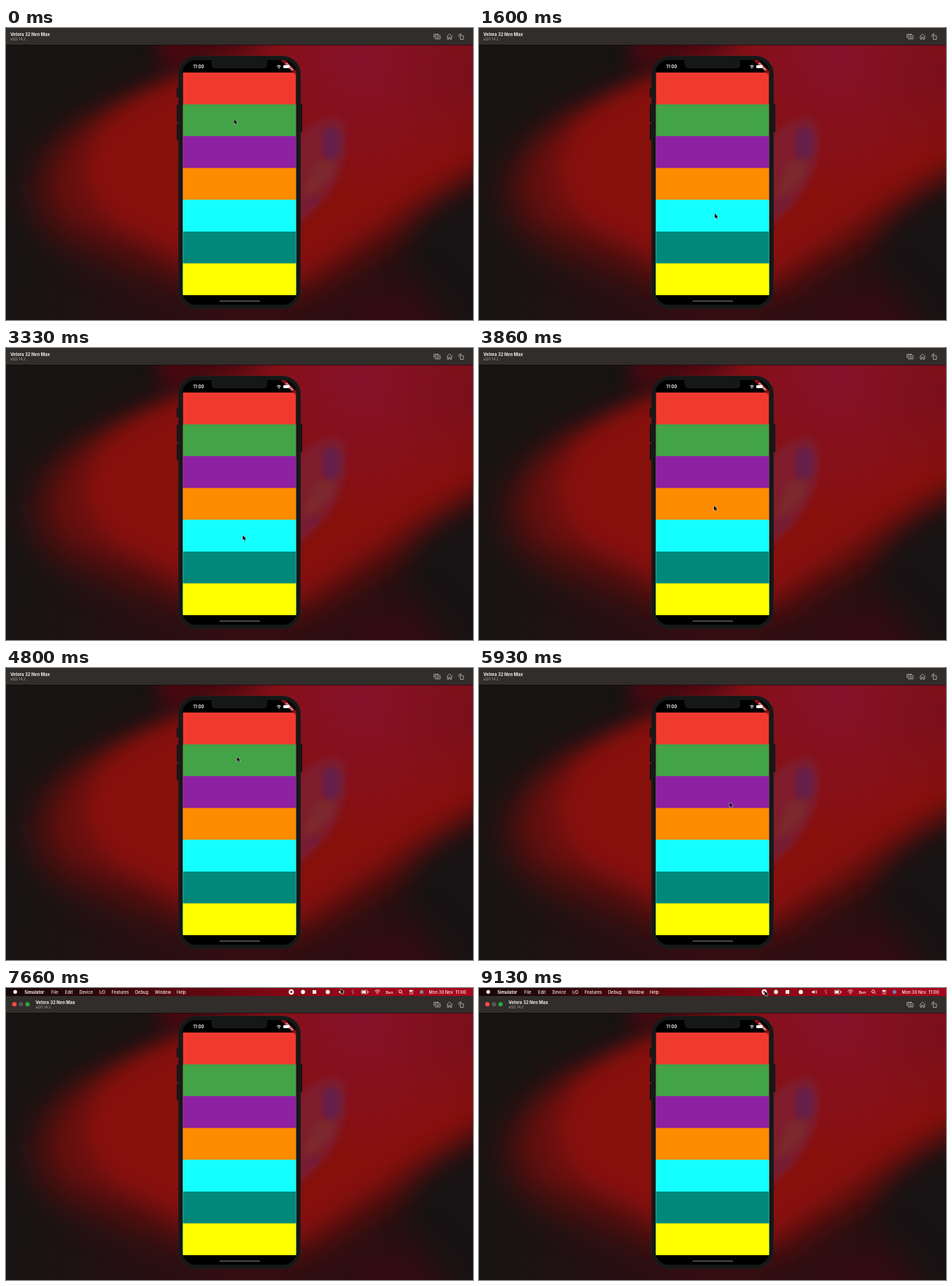
Recreate the animation shown at these times as an HTML page with a canvas. Size 640 px wide and 400 px high, loop 9.2 s.

```html
<!DOCTYPE html>
<html lang="en">
<head>
<meta charset="utf-8">
<title>Colour rows</title>
<style>
html, body { margin: 0; width: 100%; height: 100%; overflow: hidden; background: #171413; }
canvas { display: block; width: 640px; height: 400px; }
</style>
</head>
<body>
<canvas id="stage" width="640" height="400"></canvas>
<script>
const W = 640, H = 400, LOOP = 9200, STEP = 1000 / 15;
const FONT = 'Inter, "Open Sans", sans-serif';
const ctx = document.getElementById('stage').getContext('2d');

const ROWS = ['#f13a2f', '#43a347', '#8e20a2', '#ff8c00', '#14ffff', '#00897b', '#ffff00'];
const ROWS_TOP = 61, ROWS_BOTTOM = 366;

// Pointer moves: start, end, x, y
const START = [312.5, 125];
const MOVES = [
  [130, 400, 314.5, 151], [660, 930, 320, 205], [1130, 1600, 323, 254],
  [1800, 2000, 326, 291], [2200, 2460, 328, 331], [2600, 3330, 324.5, 256.5],
  [3460, 3860, 322, 216], [4060, 4460, 320, 178], [4600, 4800, 316.5, 121.5],
  [4930, 5260, 315, 80], [5530, 6000, 345, 190], [6200, 6400, 392, 348],
  [6530, 6730, 398, 381], [6860, 7130, 459.5, 22], [7130, 7330, 458.5, 1],
  [7800, 8530, 391.5, 4]
];

const clamp = v => Math.max(0, Math.min(1, v));
const ease = v => v * v * (3 - 2 * v);
const mix = (a, b, p) => a + (b - a) * p;
const progress = (t, a, b) => ease(clamp((t - a) / (b - a)));

function layer(draw) {
  const c = document.createElement('canvas');
  c.width = W;
  c.height = H;
  draw(c.getContext('2d'));
  return c;
}

function box(g, x, y, w, h, r, fill) {
  g.beginPath();
  g.roundRect(x, y, w, h, r);
  g.fillStyle = fill;
  g.fill();
}

function disc(g, x, y, r, fill) {
  g.beginPath();
  g.arc(x, y, r, 0, Math.PI * 2);
  g.fillStyle = fill;
  g.fill();
}

function line(g, d, color, width = 0.8) {
  g.strokeStyle = color;
  g.lineWidth = width;
  g.stroke(new Path2D(d));
}

function label(g, s, x, y, size, weight, color) {
  g.font = `${weight} ${size}px ${FONT}`;
  g.fillStyle = color;
  g.fillText(s, x, y);
}

const wallpaper = layer(g => {
  const soft = (d, color, blur) => {
    g.filter = `blur(${blur}px)`;
    g.fillStyle = color;
    g.fill(new Path2D(d));
    g.filter = 'none';
  };
  const glow = (x, y, r, rgb, a) => {
    const grad = g.createRadialGradient(x, y, 0, x, y, r);
    grad.addColorStop(0, `rgba(${rgb},${a})`);
    grad.addColorStop(1, `rgba(${rgb},0)`);
    g.fillStyle = grad;
    g.fillRect(0, 0, W, H);
  };
  g.fillStyle = '#171413';
  g.fillRect(0, 0, W, H);
  glow(330, 410, 330, '60,10,18', 0.75);
  // Red sweep, from its faint rim to the core
  soft('M270 50C190 85 110 105 55 165C15 215 25 270 90 305C170 340 250 365 330 375L420 375C500 335 590 260 690 205V-30H300Z', '#4a0f0e', 22);
  soft('M270 55C210 85 130 110 85 160C55 210 62 250 110 275C180 302 235 325 260 350L400 358C470 320 560 255 690 180V-30H340Z', '#68100f', 15);
  soft('M270 56C215 82 165 102 130 138C98 185 105 235 152 266C200 292 240 305 260 330L395 345C455 305 545 240 690 150V-30H360Z', '#87100d', 13);
  soft('M200 -20H400L330 40C290 45 260 42 215 62Z', '#4a0810', 14);
  glow(490, 40, 190, '132,18,52', 0.75);
  glow(640, 60, 120, '110,14,34', 0.5);
  soft('M700 195C640 220 585 245 562 280C548 320 575 360 610 400H700Z', '#171314', 20);
  soft('M440 420C470 370 510 350 550 350L620 420Z', '#380b12', 26);
  // Curled highlight
  soft('M398 152C415 132 440 118 456 124C472 136 468 182 450 214C434 242 416 258 398 270Z', 'rgba(124,34,54,.75)', 3.5);
  soft('M437 140C450 128 460 140 459 160C457 178 446 186 438 180C432 166 431 150 437 140Z', 'rgba(92,32,84,.75)', 4);
  soft('M424 184L450 180L446 202L426 224L408 238L412 212Z', 'rgba(122,50,48,.6)', 4);
  soft('M398 244L424 226L430 236L398 262Z', 'rgba(104,26,66,.5)', 4);
});

const phone = layer(g => {
  const body = '#161717';
  for (const [x, y, h] of [[234, 82, 13], [234, 105, 24], [234, 131, 23], [403, 104, 39]])
    box(g, x, y, 3, h, 1, '#131313');
  box(g, 236, 38, 168, 347, 25, '#222323');
  box(g, 236.7, 38.7, 166.6, 345.6, 24.5, body);

  g.save();
  g.beginPath();
  g.roundRect(242, 44, 156, 335, 18);
  g.clip();
  g.fillStyle = '#000';
  g.fillRect(242, 44, 156, 335);
  // Each row runs to the bottom so that no seam shows between rows
  const rowHeight = (ROWS_BOTTOM - ROWS_TOP) / ROWS.length;
  ROWS.forEach((color, i) => {
    const y = ROWS_TOP + i * rowHeight;
    g.fillStyle = color;
    g.fillRect(242.5, y, 154.9, ROWS_BOTTOM - y);
  });
  box(g, 281.5, 38, 76.5, 17.5, 6, body);
  // Corner ribbon
  g.save();
  g.translate(397.5, 44);
  g.rotate(Math.PI / 4);
  g.fillStyle = 'rgba(160,22,24,.85)';
  g.fillRect(-15, 10.5, 30, 4.5);
  g.textAlign = 'center';
  label(g, 'DEBUG', 0, 14.2, 3.8, 800, '#fff');
  g.restore();
  g.restore();

  label(g, '11:00', 256.6, 55.2, 6, 600, '#fff');
  line(g, 'M371.4 52.3Q374 50 376.6 52.3M372.5 53.7Q374 52.4 375.5 53.7', '#fff', 1);
  disc(g, 374, 55, 0.7, '#fff');
  box(g, 380, 51, 8.5, 4, 1.1, '#fff');
  box(g, 292.5, 373.2, 55.5, 1.8, 0.9, '#505050');
});

function drawToolbar(p) {
  const ink = '#bdb9b7';
  ctx.save();
  ctx.translate(0, 11 * p);
  ctx.fillStyle = '#302d2b';
  ctx.fillRect(0, 0, W, 23);
  ctx.fillStyle = 'rgba(0,0,0,.45)';
  ctx.fillRect(0, 23, W, 1);
  ctx.globalAlpha = p;
  ['#fb4c45', '#5a5654', '#2aa837'].forEach((c, i) => disc(ctx, 11.5 + i * 9, 11.2, 3, c));
  ctx.globalAlpha = 1;
  const x = 6 + 34.5 * p;
  label(ctx, 'Velora 32 Neo Max', x, 10.8, 5.9, 700, '#f2f0ef');
  label(ctx, 'eQO 14.2', x, 16.9, 4.8, 400, '#aaa6a4');

  line(ctx, 'M586.4 13.5V8.5H593M588.3 10.3H590L590.7 9.4H592.6L593.3 10.3H595V15H588.3Z', ink);
  ctx.beginPath();
  ctx.arc(591.7, 12.6, 1.3, 0, 7);
  ctx.stroke();
  line(ctx, 'M603.8 12L607.8 8.2L611.8 12M605 11.3V15.4H606.8V12.8H608.8V15.4H610.6V11.3', ink);
  line(ctx, 'M622.5 10.8H627V15.5H622.5ZM620.7 12V9.6Q620.7 8.6 622 8.6H624M623 7.5L624.1 8.6L623 9.7', ink);
  ctx.restore();
}

function drawMenu(p) {
  if (p <= 0) return;
  const white = '#f6f2f2', hole = '#84061a';
  ctx.save();
  ctx.translate(0, -11 * (1 - p));
  const grad = ctx.createLinearGradient(0, 0, W, 0);
  [[0, '#170506'], [0.15, '#28060a'], [0.35, '#52070d'], [0.6, '#860715'], [0.8, '#a0061a'], [1, '#a8061c']]
    .forEach(s => grad.addColorStop(...s));
  ctx.fillStyle = grad;
  ctx.fillRect(0, 0, W, 11);

  disc(ctx, 12.6, 5.3, 2.6, white);
  label(ctx, 'Simulator', 25.2, 7.5, 5.8, 700, white);
  const items = { File: 62, Edit: 81, Device: 100.5, 'I/O': 128, Features: 144.7, Debug: 177, Window: 204, Help: 234 };
  for (const name in items) label(ctx, name, items[name], 7.5, 5.7, 500, white);

  disc(ctx, 391, 5.4, 3.6, white);
  box(ctx, 389.7, 4.1, 2.6, 2.6, 0.4, hole);
  disc(ctx, 407, 5.4, 2.8, white);
  box(ctx, 420.2, 2.9, 5, 5, 0, white);
  disc(ctx, 441, 5.4, 2.9, white);

  ctx.fillStyle = white;
  ctx.fill(new Path2D('M456 4.4H457.6L459.6 2.7V8.1L457.6 6.5H456Z'));
  line(ctx, 'M460.7 4Q461.7 5.4 460.7 6.8M462 3Q463.8 5.4 462 7.8', white, 0.7);
  line(ctx, 'M473 3L477.3 8M475.2 2.5V8.3L477 6.8M475.2 2.5L477 4', '#c08087', 0.6);
  ctx.strokeStyle = white;
  ctx.lineWidth = 0.7;
  ctx.beginPath();
  ctx.roundRect(487, 3.2, 8.4, 4.6, 1);
  ctx.stroke();
  box(ctx, 488, 4.1, 5.2, 2.8, 0.4, white);
  line(ctx, 'M496.5 4.6V6.4', white);
  line(ctx, 'M505.3 4.3Q509 1.2 512.7 4.3M506.8 5.9Q509 4 511.2 5.9', white, 0.9);
  disc(ctx, 509, 7.5, 0.8, white);
  label(ctx, 'Ben', 520.5, 7.5, 5.4, 500, white);
  ctx.beginPath();
  ctx.arc(540.3, 4.8, 2, 0, 7);
  ctx.stroke();
  line(ctx, 'M541.8 6.3L543.8 8.3', white);
  box(ctx, 552.5, 2.8, 6, 2.3, 1.2, white);
  disc(ctx, 557.2, 3.95, 0.7, hole);
  line(ctx, 'M553.6 6.1H557.4Q558.4 7.1 557.4 8.1H553.6Q552.6 7.1 553.6 6.1Z', white, 0.6);
  disc(ctx, 569.5, 5.4, 2.7, '#777f9f');
  label(ctx, 'Mon 30 Nov', 579.5, 7.5, 5.7, 500, white);
  label(ctx, '11:00', 616, 7.5, 6, 500, white);
  ctx.restore();
}

function pointerAt(t) {
  let [x, y] = START;
  for (const [a, b, nx, ny] of MOVES) {
    const p = progress(t, a, b);
    x = mix(x, nx, p);
    y = mix(y, ny, p);
  }
  return [x, y];
}

const ARROW = new Path2D('M0 0V6.4L1.5 5.1L2.6 7.5L3.8 7L2.8 4.7H4.7Z');

function drawPointer(x, y) {
  ctx.save();
  ctx.translate(x, y);
  ctx.lineJoin = 'round';
  ctx.strokeStyle = '#e8e8e8';
  ctx.lineWidth = 1;
  ctx.stroke(ARROW);
  ctx.fillStyle = '#000';
  ctx.fill(ARROW);
  ctx.restore();
}

function render(now) {
  const clock = Math.floor((now % LOOP) / 10) * 10;
  const t = Math.floor((clock + 6.7) / STEP) * STEP;
  const p = progress(t, 7260, 7600);
  ctx.drawImage(wallpaper, 0, 0);
  ctx.drawImage(phone, 0, 0);
  drawToolbar(p);
  drawMenu(p);
  drawPointer(...pointerAt(t));
}

let origin = null;
function tick(now) {
  origin ??= now;
  render(now - origin);
  requestAnimationFrame(tick);
}
requestAnimationFrame(tick);
</script>
</body>
</html>
```
